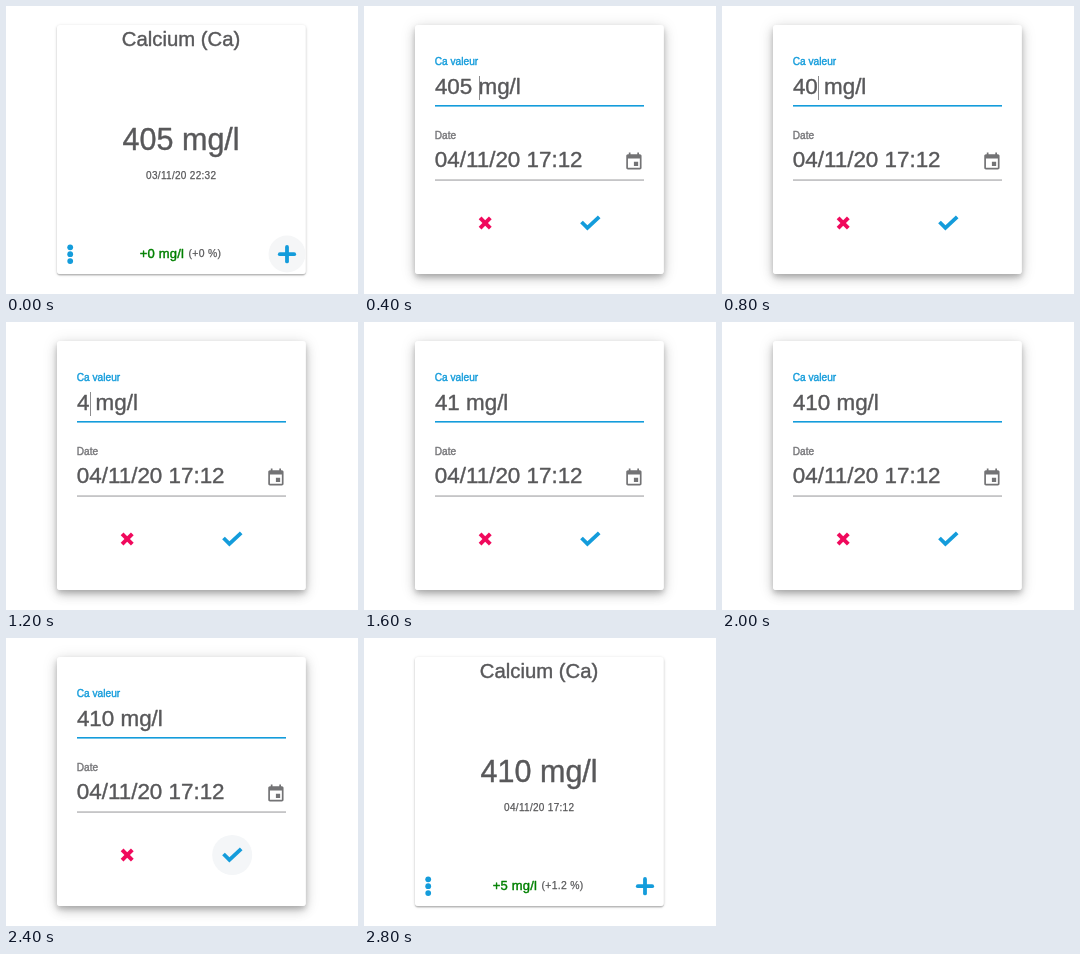
An HTML page with a canvas for the animation above (3.2 s loop, 352 by 288 pixels).

```html
<!DOCTYPE html>
<html lang="fr">
<head>
<meta charset="utf-8">
<title>Calcium</title>
<style>
html, body { margin: 0; width: 100%; height: 100%; overflow: hidden; background: #fff; }
canvas { display: block; width: 352px; height: 288px; }
</style>
</head>
<body>
<canvas id="stage" width="352" height="288"></canvas>
<script>
const ctx = document.getElementById('stage').getContext('2d');
const BLUE = '#149cdb', PINK = '#f0095c', GREY = '#58585a', LABEL = '#77777a';
const LOOP = 3200, STEP = 400;
const calendar = new Path2D('M17 12h-5v5h5v-5zM16 1v2H8V1H6v2H5c-1.11 0-1.99.9-1.99 2L3 19c0 1.1.89 2 2 2h14c1.1 0 2-.9 2-2V5c0-1.1-.9-2-2-2h-1V1h-2zm3 18H5V8h14v11z');

// One entry per step; caret is the character index, if visible.
const steps = [
  { card: true, value: '405', date: '03/11/20 22:32', delta: '+0 mg/l', percent: '(+0 %)', deltaX: 133.5, hover: true },
  { value: '405', caret: 4 },
  { value: '40', caret: 2 },
  { value: '4', caret: 1 },
  { value: '41' },
  { value: '410' },
  { value: '410', hover: true },
  { card: true, value: '410', date: '04/11/20 17:12', delta: '+5 mg/l', percent: '(+1.2 %)', deltaX: 128.5 }
];

// A thin outline gives the text its slightly heavier, smoothed weight.
function text(str, x, y, size, color, align = 'left', spacing = 0, weight = 0.4) {
  ctx.font = `${size}px "Liberation Sans", Arial, sans-serif`;
  ctx.letterSpacing = spacing + 'px';
  ctx.textAlign = align;
  ctx.fillStyle = ctx.strokeStyle = color;
  ctx.lineWidth = weight;
  ctx.lineJoin = 'round';
  ctx.fillText(str, x, y);
  ctx.strokeText(str, x, y);
}

function disc(x, y, r, color) {
  ctx.fillStyle = color;
  ctx.beginPath();
  ctx.arc(x, y, r, 0, Math.PI * 2);
  ctx.fill();
}

function line(points, width, color, cap = 'round') {
  ctx.strokeStyle = color;
  ctx.lineWidth = width;
  ctx.lineCap = cap;
  ctx.lineJoin = 'miter';
  ctx.beginPath();
  points.forEach(([x, y]) => ctx.lineTo(x, y));
  ctx.stroke();
}

function panel(shadows) {
  ctx.fillStyle = '#fff';
  ctx.beginPath();
  ctx.roundRect(51, 19, 248.7, 249, 3);
  for (const [dy, blur, alpha] of shadows) {
    ctx.shadowColor = `rgba(0,0,0,${alpha})`;
    ctx.shadowOffsetY = dy;
    ctx.shadowBlur = blur;
    ctx.fill();
  }
  ctx.shadowColor = 'transparent';
}

function drawCard(s) {
  panel([[1.5, 1, 0.14], [1, 2, 0.12], [0.7, 3.5, 0.14]]);
  text('Calcium (Ca)', 175, 40, 20.3, GREY, 'center');
  text(s.value + ' mg/l', 175.1, 144, 30.5, GREY, 'center');
  text(s.date, 175.2, 173, 10, GREY, 'center', 0.3, 0.25);
  text(s.delta, s.deltaX + 0.2, 252, 13, '#008000', 'left', 0.2, 0.45);
  text(s.percent, s.deltaX + 49, 251, 10.4, GREY, 'left', 0.3, 0.25);
  for (const y of [241.3, 248.2, 255.1]) disc(64.2, y, 2.9, BLUE);
  if (s.hover) disc(281, 248, 18.5, '#f5f6f7');
  line([[273.8, 248.2], [288.2, 248.2]], 3.8, BLUE);
  line([[281, 241], [281, 255.4]], 3.8, BLUE);
}

function drawForm(s) {
  panel([[3, 5, 0.17], [5, 11, 0.15], [2, 16, 0.13]]);
  const value = s.value + ' mg/l';
  text('Ca valeur', 70.8, 59.2, 10.15, BLUE);
  text(value, 70.9, 88, 22.4, GREY);
  if (s.caret) {
    const x = Math.round(70.9 + ctx.measureText(value.slice(0, s.caret)).width + 0.6);
    ctx.fillStyle = '#8c8c8e';
    ctx.fillRect(x, 70, 1, 24);
  }
  ctx.fillStyle = BLUE;
  ctx.fillRect(71, 99, 209, 1.6);

  text('Date', 70.8, 132.5, 10.1, LABEL);
  text('04/11/20 17:12', 70.8, 161, 22.4, GREY);
  ctx.fillStyle = '#a0a0a2';
  ctx.fillRect(71, 173.5, 209, 1.1);
  ctx.save();
  ctx.translate(259.7, 145.6);
  ctx.scale(0.85, 0.85);
  ctx.fillStyle = '#737375';
  ctx.fill(calendar);
  ctx.restore();

  line([[116.1, 211.9], [126.3, 222.1]], 3.9, PINK, 'butt');
  line([[126.3, 211.9], [116.1, 222.1]], 3.9, PINK, 'butt');
  if (s.hover) disc(226.2, 217, 20, '#f4f6f8');
  line([[217.5, 216], [223.4, 221.9], [235.2, 210.8]], 3.8, BLUE, 'butt');
}

const start = performance.now();
function frame() {
  const t = (performance.now() - start) % LOOP;
  const s = steps[Math.floor(t / STEP)];
  ctx.fillStyle = '#fff';
  ctx.fillRect(0, 0, 352, 288);
  (s.card ? drawCard : drawForm)(s);
  requestAnimationFrame(frame);
}
frame();
</script>
</body>
</html>
```
